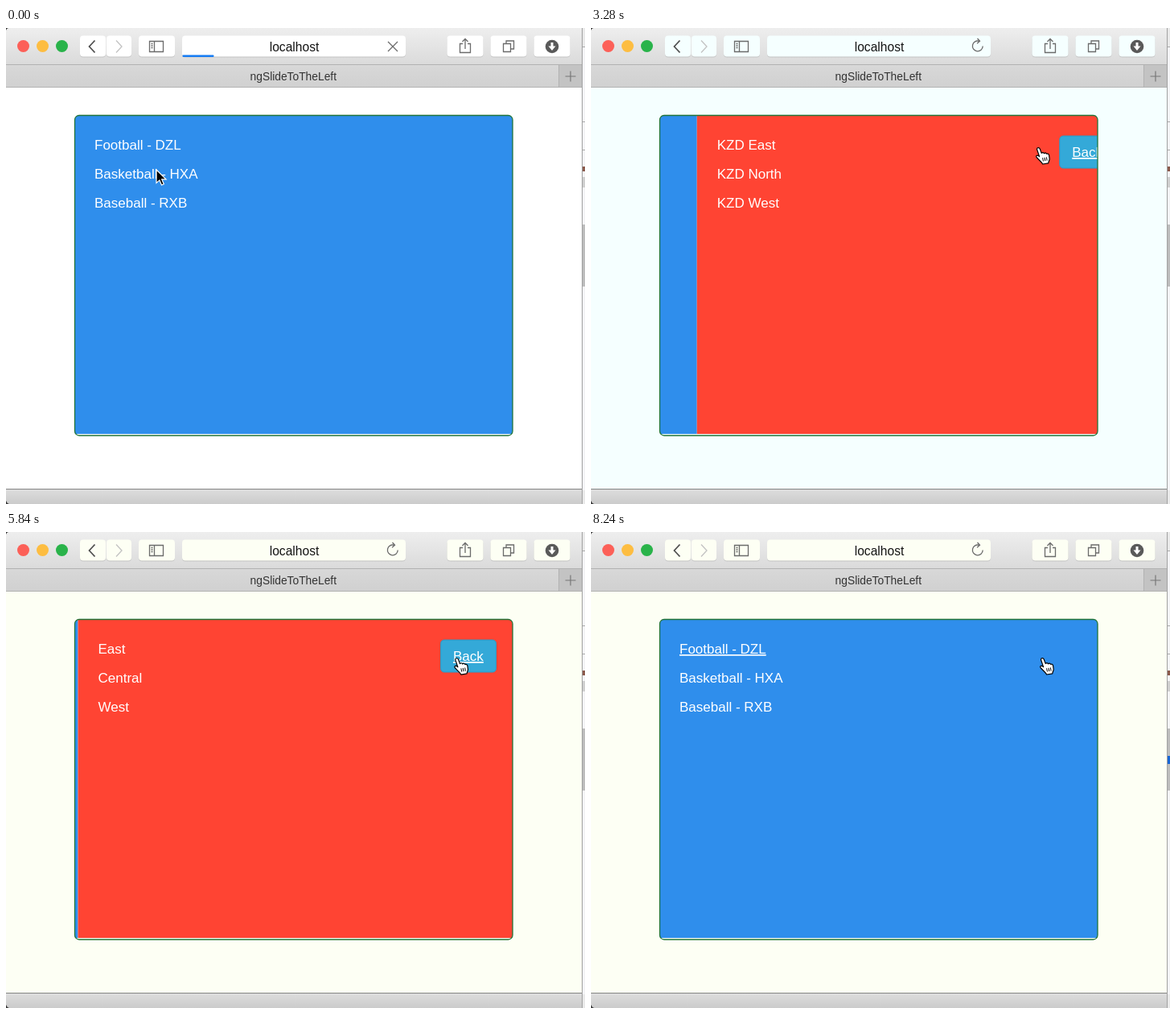
These frames come from a looping animation (720x591 px, 8.32 s). An HTML page:

```html
<!DOCTYPE html>
<html lang="en">
<head>
<meta charset="utf-8">
<title>ngSlideToTheLeft</title>
<style>
  html, body { margin: 0; width: 100%; height: 100%; overflow: hidden; background: #fff; }
  svg { display: block; width: 100vw; height: 100vh; }
  text { font-family: "Liberation Sans", Arial, sans-serif; font-size: 17px; fill: #fff; }
  .line { fill: none; stroke: #6b6b6b; stroke-width: 1.3; }
  .under { text-decoration: underline; }
</style>
</head>
<body>
<svg viewBox="0 0 720 591" preserveAspectRatio="none">
  <defs>
    <linearGradient id="bar" x2="0" y2="1">
      <stop stop-color="#eeeeee"/><stop offset="1" stop-color="#dadada"/>
    </linearGradient>
    <linearGradient id="tabs" x2="0" y2="1">
      <stop stop-color="#d8d8d8"/><stop offset="1" stop-color="#d0d0d0"/>
    </linearGradient>
    <linearGradient id="foot" x2="0" y2="1">
      <stop stop-color="#dedede"/><stop offset="1" stop-color="#cbcbcb"/>
    </linearGradient>
    <clipPath id="frame"><rect x="85.5" y="108.5" width="544.5" height="397.5" rx="5.5"/></clipPath>
  </defs>

  <!-- window behind -->
  <rect width="720" height="591" fill="#e9e9e9"/>
  <rect x="717" y="24" width="3" height="550" fill="#f3f3f5"/>
  <path d="M717 23.5h3M717 116.5h3M717 151.5h3" stroke="#aaa"/>
  <rect x="717" y="172" width="3" height="6" fill="#8b5a4c"/>
  <rect x="717" y="185" width="3" height="13" fill="#cfcfcf"/>
  <rect x="717" y="244" width="3" height="77" fill="#bdbdbd"/>
  <rect id="marker" x="717" y="278" width="3" height="10" fill="#1766d6"/>

  <!-- browser window -->
  <rect class="tint" y="74" width="716" height="498"/>
  <rect width="716" height="46" fill="url(#bar)"/>
  <rect y="46" width="716" height="28" fill="url(#tabs)"/>
  <rect x="688" y="46" width="28" height="27" fill="#c3c3c3"/>
  <path d="M0 45.5h716M0 73.5h716M687.5 46v27" stroke="#b2b2b2" fill="none"/>
  <path d="M702 53.5v13M695.500 60h13" stroke="#777" stroke-width="1.2"/>
  <rect y="572" width="716" height="19" fill="url(#foot)"/>
  <path d="M0 572.5h716" stroke="#858585"/>
  <path d="M716.500 0v591" stroke="#a2a2a2"/>
  <path d="M0 587v4h4q-3-1-4-4M0 0v3q.5-2.500 3-3z" fill="#333"/>

  <circle cx="21.500" cy="22.500" r="7.500" fill="#fc6058"/>
  <circle cx="45.500" cy="22.500" r="7.500" fill="#fdbd41"/>
  <circle cx="69.500" cy="22.500" r="7.500" fill="#29b34a"/>
  <g id="buttons"></g>
  <g class="line">
    <path d="M110.500 15.500l-7 7.500 7 7.500" stroke="#4d4d4d" stroke-width="1.700"/>
    <path d="M137 15.500l7 7.500-7 7.500" stroke="#c2c2c2"/>
    <path d="M178.500 16.500h17v13h-17zM184.500 16.500v13M180.500 19.500h2M180.500 22h2M180.500 24.500h2"/>
    <path d="M568 19.500h-3.500v11h13v-11H574M571 26V13.500M567.500 17l3.500-3.500 3.500 3.500"/>
    <path d="M618.500 19.500h9v10h-9zM622 19.500v-3.500h9.500v10H627.500"/>
    <path id="stop" d="M475 17l12 12M487 17l-12 12"/>
    <path id="reload" d="M487.200 22.500a6.400 6.400 0 1 1-4.500-6.200M480.500 13l3 3.300-3.400 3"/>
  </g>
  <circle cx="679" cy="23" r="8.300" fill="#595959"/>
  <path d="M677.500 18h3v4.500h3l-4.500 5.500-4.500-5.500h3z" fill="#fff"/>
  <rect id="progress" x="219.500" y="33.500" width="39" height="2.500" rx="1" fill="#167cf3"/>
  <text x="358.500" y="29" text-anchor="middle" style="font-size:15.600px;fill:#151515">localhost</text>
  <text x="357.300" y="65" text-anchor="middle" style="font-size:13.800px;fill:#333">ngSlideToTheLeft</text>

  <g clip-path="url(#frame)" id="slides"></g>
  <rect x="85.500" y="108.500" width="544.500" height="397.500" rx="5.500" fill="none" stroke="#23753a" stroke-width="1.300"/>

  <path id="arrow" d="M0 0V16.500L3.900 12.900 6.500 19 9.300 17.800 6.700 11.900H12z" fill="#000" stroke="#fff" stroke-width="1.200"/>
  <g id="hand" stroke="#000" stroke-width="1.200" stroke-linejoin="round">
    <path d="M-1.500 1.500C-1.500-.8 1.400-1 2.200 1L4.200 6.400C5.200 5.200 6.900 5.500 7.500 6.800 8.600 5.600 10 6 10.600 7.300 12 6.600 13.200 7.500 13.600 9L14.200 13.500C14.200 15.500 13 16.500 12.800 18.800L5.600 20C4.500 17.500 1.500 15.500-1.500 12-3.600 9.700-1.200 8.300 .6 9.800L1.600 10.600z" fill="#fff"/>
    <path d="M5.600 12.200l.9 4.200M8 11.800l.8 4.200M10.400 11.400l.7 4.200" fill="none" stroke-width="1"/>
  </g>
</svg>

<script>
const LOOP = 8320, STEP = 80, WIDTH = 545, SLIDE_MS = 500;
const $ = id => document.getElementById(id);

function add(parent, tag, attrs, content = '') {
  const node = document.createElementNS('http://www.w3.org/2000/svg', tag);
  for (const key in attrs) node.setAttribute(key, attrs[key]);
  node.textContent = content;
  parent.append(node);
  return node;
}

for (const [x, w] of [[92, 32], [125, 31], [165, 45], [219, 278], [548.5, 45], [602.5, 45], [656.5, 45]]) {
  add($('buttons'), 'rect', { x, y: 10.5, width: w, height: 26, rx: 4, fill: '#c4c4c4' });
  add($('buttons'), 'rect', { x, y: 9.5, width: w, height: 26, rx: 4, class: 'tint' });
}
const tinted = document.querySelectorAll('.tint');

function makeSlide(fill, ink, rowCount, height, hasBack) {
  const group = add($('slides'), 'g', {});
  add(group, 'rect', { x: 85, y: 108, width: WIDTH, height, fill });
  const rows = Array.from({ length: rowCount }, (_, i) =>
    add(group, 'text', { x: 110, y: 151 + 36 * i, style: `fill:${ink}` }));
  if (!hasBack) return { group, rows };
  const button = add(group, 'rect', { x: 536, y: 134, width: 69, height: 40, rx: 4.5 });
  const label = add(group, 'text', { x: 551.5, y: 160 }, 'Back');
  return { group, rows, button, label };
}

const slides = [
  makeSlide('#2f8eec', '#fff', 3, 396, false),
  makeSlide('#ff4433', '#fff', 3, 396, true),
  makeSlide('#fff559', '#666b56', 4, 398, true)
];
const setRows = (slide, names) => slide.rows.forEach((row, i) => row.textContent = names[i]);
setRows(slides[0], ['Football - DZL', 'Basketball - HXA', 'Baseball - RXB']);
setRows(slides[2], ['Pebbles', 'Jugglers', 'Spoons', 'Plumes']);
const football = ['KZD East', 'KZD North', 'KZD West'];

// Each entry holds from its time until the next one.
const divisions = [
  [0, football], [3760, ['Southeast', 'Central', 'Atlantic']],
  [5200, ['East', 'Central', 'West']], [6640, football]
];
const homeHover = [[0, -1], [320, 0], [3500, -1], [3840, 1], [5150, -1], [5280, 2], [6640, -1], [6880, 0]];
const tints = [[0, '#ffffff'], [800, '#f5ffff'], [3600, '#ffffff'], [4400, '#fafbf4'], [5360, '#fdfff4']];
const pointer = [
  [0, 'arrow'], [320, 'hand'], [2040, 'arrow'], [2240, 'hand'],
  [5120, 'arrow'], [5280, 'hand'], [6480, 'arrow'], [6880, 'hand']
];

// Start time and direction of each transition.
const moves = [[500, 1], [1250, 1], [2400, -1], [3233, -1], [3954, 1], [4597, -1], [5400, 1], [6020, -1], [6980, 1], [7620, -1]];
const path = [
  [0, 187, 176], [140, 187, 176], [400, 160, 142], [640, 160, 142], [1100, 160, 179], [1950, 160, 179],
  [2300, 561, 155], [3200, 556, 149], [3300, 556, 149], [3880, 237, 188], [4000, 239, 189],
  [4400, 561, 157], [4640, 561, 157], [4960, 471, 172], [5300, 180, 212], [5460, 180, 212],
  [5850, 561, 157], [6100, 561, 157], [6560, 185, 226], [6720, 189, 229], [6920, 170, 144],
  [7060, 170, 144], [7440, 561, 157], [LOOP, 561, 157]
];

const at = (track, t) => track.findLast(([start]) => start <= t)[1];

// cubic-bezier(.25, .1, .25, 1)
function ease(x) {
  if (x <= 0) return 0;
  if (x >= 1) return 1;
  const curve = (s, a, b) => 3 * s * (1 - s) * (a * (1 - s) + b * s) + s ** 3;
  let low = 0, high = 1;
  for (let i = 0; i < 20; i++) {
    const mid = (low + high) / 2;
    if (curve(mid, .25, .25) < x) low = mid; else high = mid;
  }
  return curve(low, .1, 1);
}

function cursorAt(t) {
  const i = path.findIndex(([time]) => time > t);
  const [t0, x0, y0] = path[i - 1], [t1, x1, y1] = path[i];
  const u = (t - t0) / (t1 - t0), k = u * u * (3 - 2 * u);
  return [x0 + (x1 - x0) * k, y0 + (y1 - y0) * k];
}

const show = (node, visible) => node.style.display = visible ? '' : 'none';

function render(t) {
  const [x, y] = cursorAt(t);
  const depth = moves.reduce((sum, [start, dir]) => sum + dir * ease((t - start) / SLIDE_MS), 0);
  const overBack = x > 530;

  slides.forEach(({ group, button, label }, i) => {
    const offset = (i - depth) * WIDTH;
    group.setAttribute('transform', `translate(${offset.toFixed(2)} 0)`);
    show(group, Math.abs(offset) < WIDTH);
    if (!button) return;
    button.setAttribute('fill', overBack ? '#34a9d8' : '#57b9e1');
    button.setAttribute('stroke', overBack ? '#2b98c5' : '#46aeda');
    label.classList.toggle('under', overBack);
  });
  setRows(slides[1], at(divisions, t));
  const hovered = at(homeHover, t);
  slides[0].rows.forEach((row, i) => row.classList.toggle('under', i === hovered));
  slides[1].rows[1].classList.toggle('under', t >= 1040 && t < 2080);

  const tint = at(tints, t);
  tinted.forEach(node => node.setAttribute('fill', tint));
  const loading = t < 480;
  show($('progress'), loading);
  show($('stop'), loading);
  show($('reload'), !loading);
  show($('marker'), t >= 6240);

  const shape = at(pointer, t);
  for (const id of ['arrow', 'hand']) {
    show($(id), id === shape);
    $(id).setAttribute('transform', `translate(${x.toFixed(2)} ${y.toFixed(2)})`);
  }
}

const begin = performance.now();
function tick(now) {
  const t = Math.max(0, now - begin) % LOOP;
  render(Math.floor(t / STEP) * STEP);
  requestAnimationFrame(tick);
}
render(0);
requestAnimationFrame(tick);
</script>
</body>
</html>
```
